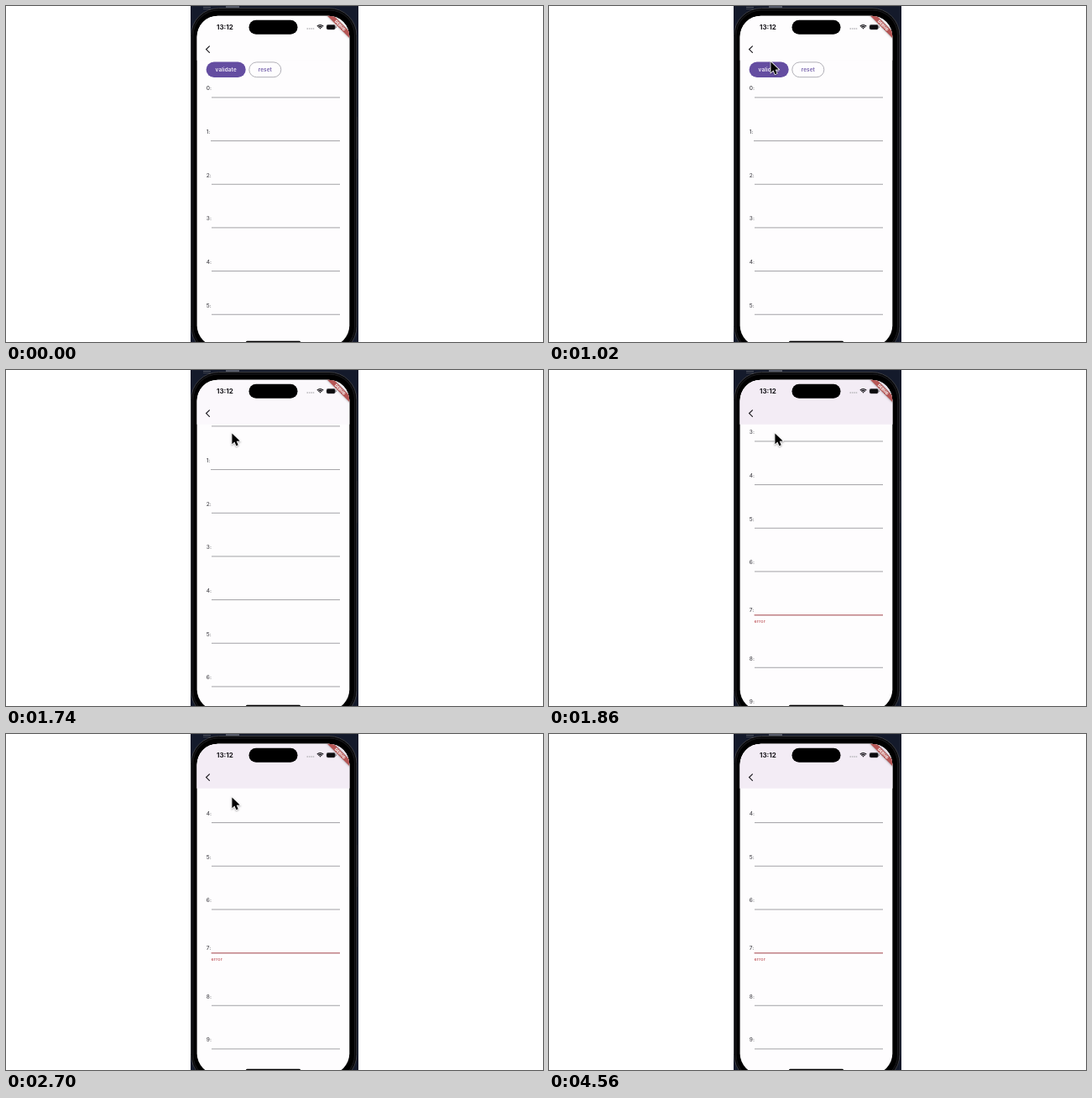
An HTML page with a canvas that plays this animation: 640 px wide and 400 px high, repeating every 4.86 s.

```html
<!DOCTYPE html>
<html lang="en">
<head>
<meta charset="utf-8">
<title>Form validation</title>
<style>
  html, body { margin: 0; width: 100%; height: 100%; overflow: hidden; background: #fff; }
  canvas { display: block; width: 640px; height: 400px; }
</style>
</head>
<body>
<canvas id="stage" width="640" height="400"></canvas>
<script>
const ctx = document.getElementById('stage').getContext('2d');
const LOOP = 4860, STEP = 60;
const PURPLE = '#644da1', ERROR = '#b53b43';
const ROW_GAP = 51.67, ERROR_ROW = 7, ERROR_HEIGHT = 11;

// Keys are [time, ...values]
const SCROLL = [[1680, 0], [1740, 42], [1800, 122], [1860, 179], [1920, 199.5],
  [1980, 206.7], [2040, 209.2], [2100, 210]];
const POINTER = [[60, 354, 163], [120, 338, 153], [180, 332, 150], [360, 332, 150],
  [420, 326, 140], [480, 311, 116], [540, 292, 92], [600, 278, 77], [720, 256, 69],
  [780, 248, 66], [900, 263, 62], [1020, 264, 66], [1200, 268, 77], [1380, 269, 75],
  [3240, 269, 75], [3300, 278, 73], [3360, 318, 58]];

const clamp = v => Math.max(0, Math.min(1, v));

function sample(keys, time) {
  const next = keys.findIndex(k => k[0] >= time);
  if (next === 0) return keys[0].slice(1);
  if (next < 0) return keys[keys.length - 1].slice(1);
  const a = keys[next - 1], b = keys[next];
  const u = (time - a[0]) / (b[0] - a[0]);
  return a.slice(1).map((v, i) => v + (b[i + 1] - v) * u);
}

function fillRect(x, y, w, h, color) {
  ctx.fillStyle = color;
  ctx.fillRect(x, y, w, h);
}

function roundRect(x, y, w, h, r, fill, stroke, width = 1) {
  ctx.beginPath();
  ctx.roundRect(x, y, w, h, r);
  if (fill) { ctx.fillStyle = fill; ctx.fill(); }
  if (stroke) { ctx.strokeStyle = stroke; ctx.lineWidth = width; ctx.stroke(); }
}

function text(str, x, y, size, color, { weight = 500, align = 'left', spacing = 0 } = {}) {
  ctx.font = `${weight} ${size}px Inter, Roboto, sans-serif`;
  ctx.textAlign = align;
  ctx.textBaseline = 'alphabetic';
  ctx.letterSpacing = spacing + 'px';
  ctx.fillStyle = color;
  ctx.fillText(str, x, y);
}

function polyline(points, color, width) {
  ctx.beginPath();
  points.forEach(([x, y]) => ctx.lineTo(x, y));
  ctx.strokeStyle = color;
  ctx.lineWidth = width;
  ctx.stroke();
}

function drawPhone() {
  fillRect(220, 0, 200, 400, '#141a2b');
  fillRect(235, 1, 9, 1, '#50545f');
  fillRect(235, 3, 9, 1, '#3c404b');
  roundRect(262, -3, 16, 7, 2, '#555a68');
  fillRect(418, 132, 1, 50, '#2b2d33');
  roundRect(220.5, 2.5, 197.5, 412, 33, '#08080a', '#3a3b40');
  roundRect(223, 5, 192.5, 407, 30, '#000', '#1b1b1e');
}

function drawRow(index, scroll, errorAlpha) {
  const failed = index === ERROR_ROW;
  const extra = ERROR_HEIGHT * errorAlpha;
  const top = 98 + index * ROW_GAP - scroll + (index > ERROR_ROW ? extra : 0);
  const line = top + 10.9 + (failed ? 0.2 : 0);
  const start = index === 1 ? 244 : 245;
  text(index + ':', 238.7, top + (failed ? extra / 2 : 0) + 2.3, 6.5, '#4b4a50', { spacing: 0.1 });
  fillRect(start, line - 0.5, 398 - start, 1, '#a3a2a6');
  if (failed && errorAlpha > 0) {
    ctx.globalAlpha = errorAlpha;
    fillRect(244.5, line - 0.5, 153.5, 1, '#c4676c');
    text('error', 244.5, line + 9.1, 5.4, ERROR, { weight: 400, spacing: 0.2 });
    ctx.globalAlpha = 1;
  }
}

function drawButtons(scroll) {
  const y = 66.5 - scroll;
  const label = { weight: 600, align: 'center', spacing: 0.15 };
  roundRect(238.6, y, 47.1, 18.5, 9.25, PURPLE);
  text('validate', 262.2, y + 11.5, 6.3, '#f4f0fa', label);
  roundRect(289.8, y + 0.4, 38, 17.8, 8.9, null, '#a9a7af', 0.9);
  text('reset', 308.8, y + 11.5, 6.3, '#7561ab', label);
}

function drawStatusBar() {
  text('13:12', 251, 28.2, 8, '#151318', { weight: 700 });
  roundRect(289.5, 16.8, 58, 17, 8.5, '#000');
  for (let i = 0; i < 4; i++) fillRect(358.5 + i * 2.4, 26.3, 1.5, 1.4, '#b4b2b7');
  // Wi-Fi fan
  ctx.strokeStyle = '#17151a';
  ctx.lineWidth = 1.35;
  for (const r of [1, 3, 5]) {
    ctx.beginPath();
    ctx.arc(374.5, 27.6, r, -Math.PI * 0.76, -Math.PI * 0.24);
    ctx.stroke();
  }
  roundRect(382, 22.3, 10.4, 5.8, 1.8, '#0c0b0e', '#77757a', 0.5);
  fillRect(393, 24.3, 0.8, 1.8, '#77757a');
  ctx.lineCap = 'round';
  polyline([[242.4, 47.8], [238.6, 51.6], [242.4, 55.4]], '#1d1b20', 1.2);
  ctx.lineCap = 'butt';
}

function drawBanner() {
  ctx.save();
  ctx.translate(409.3, 12);
  ctx.rotate(Math.PI / 4);
  ctx.shadowColor = 'rgba(0,0,0,.45)';
  ctx.shadowBlur = 2.5;
  fillRect(-20, 12.9, 40, 5.5, '#b65655');
  ctx.shadowColor = 'transparent';
  text('DEBUG', 0, 17.3, 4.6, '#fff', { weight: 800, align: 'center' });
  ctx.restore();
}

function drawPointer(x, y) {
  ctx.save();
  ctx.translate(x + 0.4, y + 0.4);
  ctx.beginPath();
  [[0, 0], [0, 12.8], [3, 10.2], [5, 14.8], [7.3, 13.8], [5.3, 9.3], [9.3, 9.2]]
    .forEach(([px, py]) => ctx.lineTo(px, py));
  ctx.closePath();
  ctx.shadowColor = 'rgba(0,0,0,.35)';
  ctx.shadowBlur = 2;
  ctx.shadowOffsetY = 1;
  ctx.strokeStyle = '#fff';
  ctx.lineWidth = 1.5;
  ctx.stroke();
  ctx.shadowColor = 'transparent';
  ctx.fillStyle = '#000';
  ctx.fill();
  ctx.restore();
}

function draw(time) {
  const [scroll] = sample(SCROLL, time);
  const errorAlpha = clamp((time - 1680) / 120);
  const barAlpha = clamp((time - 1680) / 180);

  fillRect(0, 0, 640, 400, '#fff');
  drawPhone();

  ctx.save();
  ctx.beginPath();
  ctx.roundRect(227.6, 11.7, 181.7, 393.5, 25);
  ctx.clip();
  fillRect(227, 11, 183, 389, '#fefdfe');
  for (let i = 0; i <= 10; i++) drawRow(i, scroll, errorAlpha);
  drawButtons(scroll);
  fillRect(227, 11, 183, 53.7, '#fefdfe');
  ctx.globalAlpha = barAlpha;
  fillRect(227, 11, 183, 53.7, '#f3ecf5');
  ctx.globalAlpha = 1;
  drawStatusBar();
  drawBanner();
  roundRect(286, 398.8, 65, 3, 1.5, '#000');
  ctx.restore();

  if (time >= 60 && time < 3420) drawPointer(...sample(POINTER, time));
}

function tick() {
  const time = performance.now() % LOOP;
  draw(Math.floor(time / STEP) * STEP);
  requestAnimationFrame(tick);
}
tick();
</script>
</body>
</html>
```
